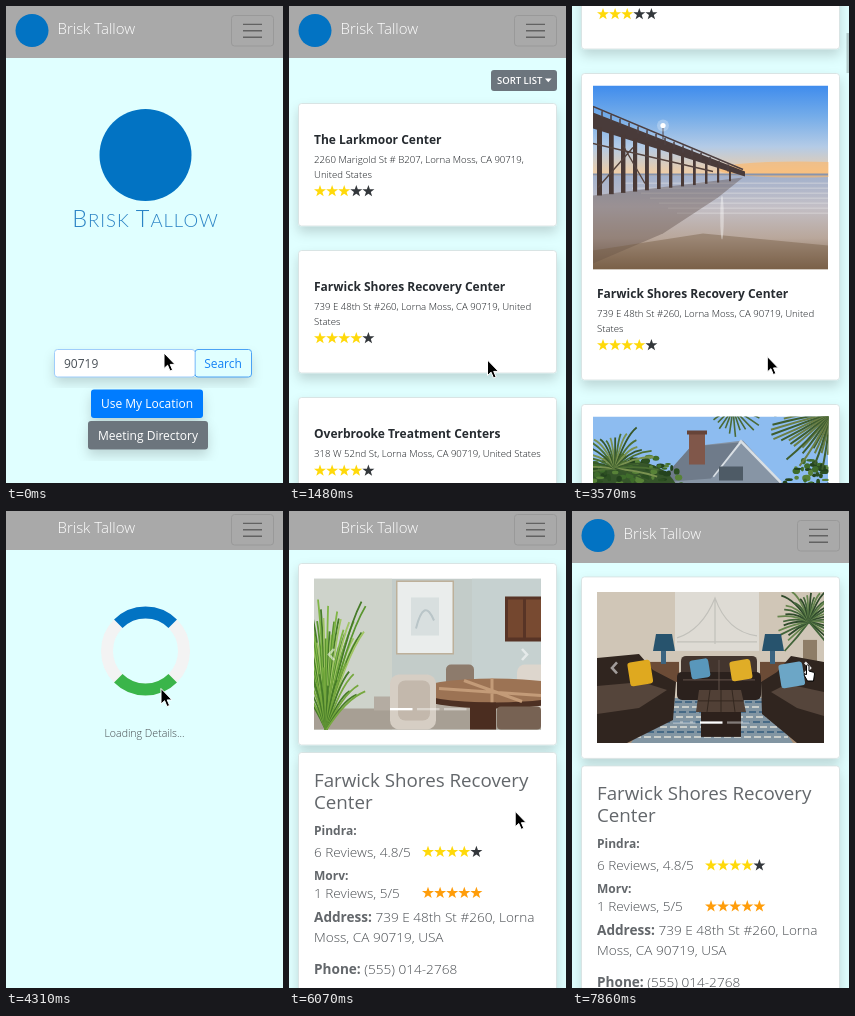
An HTML page that plays this animation: 277 px wide and 477 px high, repeating every 8000 ms.

```html
<!DOCTYPE html>
<html lang="en">
<head>
<meta charset="utf-8">
<title>Center finder</title>
<style>
html, body { margin: 0; width: 100%; height: 100%; overflow: hidden; background: #e0ffff; }
svg { display: block; }
text { font-family: "Open Sans", sans-serif; white-space: pre; }
.light { font-weight: 300; }
.bold { font-weight: 700; }
.mark { font-family: Lato, sans-serif; font-weight: 300; letter-spacing: 1px; }
</style>
</head>
<body>
<svg id="stage" width="100%" height="100%" viewBox="0 0 277 477"></svg>
<script>
const LOOP = 8000, STEP = 148.2;
const BLUE = '#0273c3', GREEN = '#3ab54a', GRAY = '#6c757d', INK = '#4a4e52', SOFT = '#63676b';

let seed = 7;
const rnd = () => (seed = (seed * 16807) % 2147483647) / 2147483647;
const repeat = (n, f) => Array.from({ length: n }, (_, i) => f(i)).join('');

const rect = (x, y, w, h, fill, more = '') =>
  `<rect x="${x}" y="${y}" width="${w}" height="${h}" fill="${fill}" ${more}/>`;
const poly = (points, fill, more = '') => `<polygon points="${points}" fill="${fill}" ${more}/>`;
const oval = (x, y, rx, ry, fill, more = '') =>
  `<ellipse cx="${x}" cy="${y}" rx="${rx}" ry="${ry}" fill="${fill}" ${more}/>`;
const line = (d, color, width = 1, more = '') =>
  `<path d="${d}" fill="none" stroke="${color}" stroke-width="${width}" ${more}/>`;
const text = (x, y, str, size, fill, more = '') =>
  `<text x="${x}" y="${y}" font-size="${size}" fill="${fill}" ${more}>${str}</text>`;
const group = (id, body) => `<g id="${id}">${body}</g>`;
const frame = (x, y, w, h, body) => `<svg x="${x}" y="${y}" width="${w}" height="${h}">${body}</svg>`;
const LIGHT = 'class="light"', BOLD = 'class="bold"', MID = 'text-anchor="middle"';
const SHADOW = 'filter="url(#shadow)"';

const panel = (y, h) =>
  rect(9.5, y, 258, h, '#fff', `rx="3" stroke="#d5dfdf" stroke-width=".8" ${SHADOW}`);

function star(cx, cy, fill) {
  const pts = Array.from({ length: 10 }, (_, i) => {
    const r = i % 2 ? 2.5 : 6.3, a = (i - 2.5) * Math.PI / 5;
    return `${(cx + r * Math.cos(a)).toFixed(1)},${(cy + r * Math.sin(a)).toFixed(1)}`;
  });
  return poly(pts.join(' '), fill);
}
const stars = (x, y, n, color = '#ffd90a') =>
  repeat(5, i => star(x + 6 + i * 12.1, y, i < n ? color : '#33373b'));

// Scattered leaves inside an ellipse
const leaves = (x, y, rx, ry, n, colors) => repeat(n, i => {
  const a = rnd() * 6.28, d = Math.sqrt(rnd());
  return oval((x + rx * d * Math.cos(a)).toFixed(1), (y + ry * d * Math.sin(a)).toFixed(1),
    (1.5 + rnd() * 3).toFixed(1), (1 + rnd() * 2.2).toFixed(1), colors[i % colors.length]);
});
// Long blades fanning out from one point
const fan = (x, y, r, from, to, n, colors, width = 2) => repeat(n, i => {
  const a = (from + (to - from) * i / (n - 1)) * Math.PI / 180, k = r * (.6 + .4 * rnd());
  const ex = x + k * Math.cos(a), ey = y + k * Math.sin(a);
  return line(`M${x} ${y}Q${(x + k * .5 * Math.cos(a)).toFixed(1)} ${(y + k * .7 * Math.sin(a) - 4).toFixed(1)} ${ex.toFixed(1)} ${ey.toFixed(1)}`,
    colors[i % colors.length], width);
});

const greens = ['#2c4f22', '#3f6c2b', '#24431e', '#588238'];

const courtyard = () =>
  rect(0, 0, 235, 194, '#f1f4f5') +
  leaves(75, 18, 60, 20, 50, ['#a6b59a', '#7f9670', '#c6cfbd']) +
  poly('0,24 42,40 42,130 0,140', '#b9b5a8') + poly('0,14 48,36 48,48 0,32', '#55493f') +
  poly('36,64 130,58 130,122 36,125', '#a29b8c') + poly('60,56 135,46 135,60 52,66', '#75695d') +
  poly('175,40 235,26 235,125 175,118', '#a59e92') + poly('165,36 235,14 235,44 165,52', '#6d5c4e') +
  rect(203, 66, 18, 24, '#59645f') + rect(8, 52, 12, 34, '#535b53') +
  line('M14 78H48M14 92H48' + repeat(9, i => `M${14 + i * 4} 78V92`), '#8d4a44', 1.2) +
  rect(0, 112, 235, 82, '#44662a') + leaves(120, 108, 105, 18, 130, greens) +
  poly('0,150 52,128 88,124 50,160 58,194 0,194', '#cfcac2') +
  oval(122, 152, 76, 34, '#5d9430') + oval(112, 158, 46, 13, '#82b843') + oval(130, 138, 52, 12, '#365c24') +
  poly('58,194 90,180 190,182 190,194', '#4c7d2a') +
  rect(45, 0, 10, 130, '#aaa193') + rect(92, 14, 8, 102, '#9b9081') +
  fan(96, 16, 44, 150, 390, 18, ['#8aa077', '#66824f', '#a9b79a'], 1.6) +
  line('M146 112L150 80M152 112L156 80M156 112L166 82', '#665341', 3.5) +
  oval(153, 54, 45, 34, '#35592a') + leaves(153, 52, 48, 38, 230, ['#2f5226', '#41682f', '#284720', '#58803d']) +
  leaves(15, 126, 24, 10, 30, greens) + rect(0, 134, 20, 34, '#3e4742') + rect(20, 126, 24, 26, '#596058') +
  line('M184 194V166L232 98M186 186L235 120' + repeat(10, i => `M${187 + i * 5} ${162 - i * 6.8}V${190 - i * 4}`), '#8d2d2b', 2.6) +
  line('M6 194L62 182V194M34 187V194', '#a53530', 2.2);

const pier = () =>
  rect(0, 0, 235, 92, 'url(#sky)') + rect(0, 90, 235, 94, 'url(#sea)') +
  oval(205, 84, 80, 8, '#ffb766', 'opacity=".6"') + rect(0, 88, 235, 2, '#8694ae') +
  repeat(7, i => rect(30 + i * 9, 97 + i * 5, 205 - i * 9, 1.5, '#e6e4e6', 'opacity=".35"')) +
  poly('0,110 150,92 125,112 70,148 0,178', '#5e4d48', 'opacity=".4"') +
  poly('0,165 110,148 235,160 235,184 0,184', '#775d45', 'opacity=".45"') +
  poly('0,27 152,86 152,91 0,43', '#493b3a') +
  line('M0 21L150 84' + repeat(16, i => `M${i * 9} ${22 + i * 3.8}v7`), '#4d3f40', 1.5) +
  repeat(12, i => rect(4 + i * 12, 42 + i * 3.7, 5 - i * .28, 68 - i * 5, '#4a3a37')) +
  line('M0 58L120 86M5 102L40 62M30 60L52 98', '#54423c', 1.4) +
  line('M70 40V54', '#4d3f40') + oval(70, 40, 2.6, 2.6, '#fff') + oval(70, 40, 6, 6, '#fff', 'opacity=".25"') +
  oval(129, 132, 1.8, 22, '#fff', 'opacity=".4"');

const house = () =>
  rect(0, 0, 235, 184, '#8dbcf0') +
  poly('66,66 98,30 150,24 188,66 188,184 66,184', '#8795a5') + line('M120 60L148 25L188 66', '#d9dfe4', 2.5) +
  poly('66,66 98,30 146,26 118,62', '#6f7b8a') + rect(96, 16, 16, 32, '#80574a') + rect(94, 14, 20, 4, '#664439') +
  rect(126, 50, 24, 14, '#4e5b66') + oval(36, 80, 50, 36, '#35552a') +
  leaves(38, 74, 54, 38, 190, greens) + leaves(220, 76, 32, 36, 100, greens) +
  fan(22, 52, 48, 170, 380, 24, ['#4d7034', '#7a9250', '#38572a'], 1.8) +
  fan(238, -4, 66, 90, 190, 24, ['#3f5e30', '#6b7f45'], 2) + fan(140, -8, 32, 20, 150, 11, ['#4b6a37'], 1.6);

const dining = () =>
  rect(0, 0, 227, 151, '#c3ccc9') + rect(0, 0, 78, 151, '#ced3cb') + rect(158, 0, 69, 151, '#c6d1d0') +
  rect(82, 2, 58, 74, '#bdb09a') + rect(83.5, 3.5, 55, 71, '#eaedec') + rect(97, 19, 28, 38, '#d8dfdf') +
  line('M102 50Q110 18 120 42', '#b9c5c8', 2) +
  rect(191, 18, 36, 45, '#583426') + rect(194, 21, 15, 38, '#74472f') + rect(212, 21, 15, 38, '#784a31') +
  rect(0, 130, 227, 21, '#a79f94') + rect(60, 118, 167, 14, '#b4aca2') +
  fan(12, 152, 135, 252, 291, 36, ['#5a962f', '#80b646', '#467b28', '#a0c565'], 1.8) +
  fan(12, 152, 70, 235, 315, 18, ['#467b28', '#76a83e'], 1.8) +
  rect(132, 86, 28, 24, '#8d7b6c', 'rx="5"') + rect(203, 86, 32, 60, '#ddd6cd', 'rx="8"') +
  oval(180, 117, 76, 13, '#4d3023') + oval(180, 112, 76, 12, '#9c7354') +
  line('M125 110L227 117M150 102L208 123M178 100V124', '#c39b78', 3) +
  rect(156, 124, 26, 27, '#4b2d20') + rect(183, 128, 44, 23, '#776253', 'rx="4"') +
  rect(76, 96, 46, 55, '#d6cec4', 'rx="9"') + rect(84, 102, 32, 40, '#c3b8ac', 'rx="7"');

const pillow = (x, y, w, h, fill) => rect(x, y, w, h, fill, `rx="3" transform="rotate(-9 ${x} ${y})"`);
const lamp = x => rect(x + 8, 58, 5, 14, '#3b6480') + poly(`${x + 3},42 ${x + 19},42 ${x + 22},59 ${x},59`, '#27536d');
const lounge = () =>
  rect(0, 0, 227, 151, '#d0c6b7') + rect(0, 110, 227, 41, '#a58b72') +
  rect(78, 0, 84, 59, '#dedbd4') + line('M80 46Q105 38 118 6Q130 40 160 44M118 6V52M80 50H160', '#c2c1bb', 1.2) +
  fan(212, 30, 40, 130, 410, 34, ['#43653a', '#67864e', '#2f4a2b'], 1.8) + rect(206, 48, 14, 24, '#8e7d67') +
  rect(52, 70, 30, 20, '#6b4b36') + rect(163, 70, 30, 20, '#6b4b36') + lamp(56) + lamp(165) +
  poly('62,106 166,106 196,151 34,151', '#8295a2') +
  repeat(8, i => line(`M${58 - i * 3} ${110 + i * 5}H${170 + i * 3}`, i % 2 ? '#c8cdca' : '#476a86', 2, 'stroke-dasharray="7 3"')) +
  rect(84, 64, 76, 25, '#43352e', 'rx="5"') + rect(80, 80, 84, 28, '#2b211d', 'rx="5"') + line('M86 88H158M122 68V104', '#63534a') +
  poly('0,66 42,62 56,78 79,90 76,128 30,151 0,151', '#30251f') + poly('0,94 45,90 70,98 42,116 0,122', '#55453b') +
  poly('227,70 194,64 180,80 164,90 165,122 200,151 227,151', '#30251f') + poly('227,100 190,92 174,100 200,116 227,124', '#55453b') +
  pillow(30, 71, 23, 24, '#dfa91f') + pillow(92, 69, 19, 19, '#5997bb') + pillow(132, 70, 21, 20, '#e0ad27') + pillow(181, 73, 24, 24, '#6ca6c6') +
  rect(104, 118, 40, 27, '#2d211c') + poly('102,98 144,98 149,120 99,120', '#514036') +
  line('M101 109H147M113 98L110 120M124 98V120M135 98L138 120', '#33271f');

const centers = [
  { name: 'The Larkmoor Center', lines: ['2260 Marigold St # B207, Lorna Moss, CA 90719,', 'United States'], score: 3, h: 193.5, photo: courtyard },
  { name: 'Farwick Shores Recovery Center', lines: ['739 E 48th St #260, Lorna Moss, CA 90719, United', 'States'], score: 4, h: 184, photo: pier },
  { name: 'Overbrooke Treatment Centers', lines: ['318 W 52nd St, Lorna Moss, CA 90719, United States'], score: 4, h: 184, photo: house }
];

function list(withPhotos) {
  let y = 97.5;
  const cards = centers.map(c => {
    const h = withPhotos ? c.h : 0, tall = h + 93.5 + c.lines.length * 14.5, top = y;
    y += tall + 24.5;
    return panel(top, tall) + (h ? frame(21, top + 12, 235.5, h, c.photo()) : '') +
      text(25, top + h + 40.5, c.name, 12, '#262b30', BOLD) +
      c.lines.map((s, i) => text(25, top + h + 59.7 + i * 14.5, s, 9.6, '#15191d', LIGHT)).join('') +
      stars(25, top + h + 58.7 + c.lines.length * 14.5, c.score);
  });
  return rect(202, 64, 66, 21, GRAY, 'rx="3"') +
    text(208, 77.8, 'SORT LIST', 9.5, '#fff', 'font-weight="600"') + poly('256,72.6 262.6,72.6 259.3,76.2', '#fff') + cards.join('');
}

const home = () =>
  `<circle cx="139.5" cy="149" r="46" fill="${BLUE}"/>` +
  `<text x="139.5" y="221" class="mark" fill="#2a83c5" ${MID} font-size="18.5"><tspan font-size="23.5">B</tspan>RISK <tspan font-size="23.5">T</tspan>ALLOW</text>` +
  `<g ${SHADOW}>` + rect(48.5, 343.5, 197, 27.5, '#e0ffff', 'rx="3"') + '</g>' +
  rect(189, 343.5, 56.5, 27.5, '#e0ffff', 'rx="3" stroke="#4ba2f5"') +
  rect(48.5, 343.5, 140.5, 27.5, '#fff', 'rx="3" stroke="#9fcdfb"') +
  text(58, 361.5, '90719', 12, '#495057') + text(217, 361.5, 'Search', 12, '#1482f5', MID) +
  rect(85, 383.5, 112, 28.5, '#007bff', `rx="3" ${SHADOW}`) + text(141, 402, 'Use My Location', 12, '#fff', MID) +
  rect(82, 415, 120, 28.5, GRAY, `rx="3" ${SHADOW}`) + text(142, 433.5, 'Meeting Directory', 12, '#fff', MID);

const loading = () =>
  '<circle cx="139.5" cy="140" r="38.5" fill="none" stroke="#f3f3f3" stroke-width="12"/>' +
  line('M112.3 112.8A38.5 38.5 0 0 1 166.7 112.8', BLUE, 12) +
  line('M112.3 167.2A38.5 38.5 0 0 0 166.7 167.2', GREEN, 12) +
  `<text id="loadText" x="138.5" y="226" font-size="10.6" fill="#44494d" class="light" ${MID}></text>`;

const score = (y, site, label, n, color) =>
  text(25, y, site, 12, SOFT, BOLD) + text(25, y + (n < 5 ? 22 : 18.5), label, 13.6, INK, LIGHT) +
  stars(133, y + (n < 5 ? 17 : 13.5), n, color);
const field = (y, label, value) =>
  `<text x="25" y="${y}" font-size="13.6" fill="${INK}" class="light"><tspan class="bold" fill="${SOFT}">${label}</tspan> ${value}</text>`;

const detail = () =>
  panel(52.5, 181.5) +
  frame(25, 67.5, 227, 151.5, group('track', dining() + `<g transform="translate(227)">${lounge()}</g>`)) +
  repeat(3, i => rect(101 + i * 27, 197, 22.5, 2.3, '#fff', 'class="dot"')) +
  line('M45 138L40 143.5L45 149', '#fff', 2.6, 'opacity=".55"') +
  line('M233 138L238 143.5L233 149', '#fff', 2.6, 'id="next"') +
  panel(241.5, 300) +
  text(25, 275.5, 'Farwick Shores Recovery', 18.75, SOFT) + text(25, 298, 'Center', 18.75, SOFT) +
  score(324, 'Pindra:', '6 Reviews, 4.8/5', 4) + score(368.5, 'Morv:', '1 Reviews, 5/5', 5, '#ff9d0a') +
  field(410.5, 'Address:', '739 E 48th St #260, Lorna') + text(25, 431, 'Moss, CA 90719, USA', 13.6, INK, LIGHT) +
  field(463, 'Phone:', '(555) 014-2768');

const header = () =>
  rect(0, 0, 277, 52, '#a9a9a9', 'id="bar"') + `<circle id="logo" cx="26" cy="24.5" r="16.5" fill="${BLUE}"/>` +
  group('nav', text(51.5, 28.4, 'Brisk Tallow', 15, '#fff', LIGHT) +
    rect(225.5, 9.5, 42, 30.5, 'none', 'rx="3" stroke="#999"') +
    line('M237 18.4H256M237 24.8H256M237 31.2H256', '#626262', 1.4));

const grad = (id, stops) => `<linearGradient id="${id}" x2="0" y2="1">` +
  stops.map((c, i) => `<stop offset="${i / (stops.length - 1)}" stop-color="${c}"/>`).join('') + '</linearGradient>';

document.getElementById('stage').innerHTML =
  `<defs><filter id="shadow" x="-20%" y="-20%" width="140%" height="160%"><feDropShadow dx="0" dy="6" stdDeviation="6" flood-opacity=".16"/></filter>` +
  grad('sky', ['#3f8ced', '#74ace9', '#b4cbe6', '#f8cd9c']) + grad('sea', ['#a3b1cc', '#c3bfc6', '#b9a79b', '#7d6249']) + '</defs>' +
  rect(0, 0, 277, 477, '#e0ffff') +
  group('page', group('home', home()) + group('loading', loading()) + group('plain', list(false)) +
    group('rich', list(true)) + group('detail', detail()) + header()) +
  rect(274.5, 0, 2.5, 40, '#000', 'id="thumb" opacity=".2"') +
  group('cursor', '<path id="arrow" d="M0 0V15.5L3.6 12.2L6 18L8.6 17L6.2 11.4H11Z" stroke="#fff"/>' +
    '<path id="hand" d="M3 1.5Q4.3 0 5.5 1.5V7L10 8.3Q11 8.7 11 10L10 17H4L.5 11Q.5 9.5 3 10.5Z" fill="#fff" stroke="#000"/>');

const $ = id => document.getElementById(id);
const dots = document.querySelectorAll('.dot');
const show = (id, on) => $(id).setAttribute('display', on ? 'inline' : 'none');
const move = (id, x, y) => $(id).setAttribute('transform', `translate(${x} ${y})`);

// Keys: [step, x, y]
const pointer = [[0, 158, 347], [3, 206, 354], [8, 203, 356], [10, 198.5, 354], [13, 198.5, 354], [14, 196.5, 354], [18, 196.5, 354],
  [19, 196.3, 351.2], [23, 196.3, 351.2], [24, 195.3, 350.5], [26, 195.3, 350.5], [29, 155, 177.5], [31, 155, 177.5], [34, 162, 112],
  [39, 226.2, 300.3], [45, 226.2, 300.3], [48, 231.5, 150], [49, 231.5, 150], [50, 231.5, 153], [53, 231.5, 153]];
const scrolling = [[0, 0], [18, 0], [19, 6], [20, 190], [21, 370.5], [25, 370.5], [26, 0], [53, 0]];

function at(keys, s, axis) {
  const i = Math.max(1, keys.findIndex(k => k[0] >= s));
  const a = keys[i - 1], b = keys[i];
  return a[axis] + (b[axis] - a[axis]) * (s - a[0]) / (b[0] - a[0]);
}
const ease = p => p * p * (3 - 2 * p);

function render(t) {
  const s = Math.min(53, Math.floor((t + 12) / STEP));
  const search = s >= 4 && s < 9, opening = s >= 26 && s < 40, compact = s >= 26 && s < 42;
  const scroll = at(scrolling, s, 1);

  show('home', s < 4);
  show('loading', search || opening);
  show('plain', s >= 9 && s < 12);
  show('rich', s >= 12 && s < 26);
  show('detail', s >= 40);
  $('loadText').textContent = search ? 'Loading Results...' : 'Loading Details...';

  show('logo', !compact);
  $('bar').setAttribute('height', compact ? 39 : 52);
  move('nav', 0, compact ? -6 : 0);
  move('loading', 0, compact ? 0 : 13);
  move('detail', 0, compact ? 0 : 13.4);
  move('page', 0, -scroll);
  show('thumb', s >= 19 && s < 26);
  $('thumb').setAttribute('y', scroll * .073);

  move('track', -227 * ease(Math.min(1, Math.max(0, (s - 49.2) / 3.8))), 0);
  dots.forEach((d, i) => d.setAttribute('opacity', i === (s >= 50 ? 1 : 0) ? 1 : .4));
  $('next').setAttribute('opacity', s >= 48 ? .9 : .55);

  move('cursor', at(pointer, s, 1), at(pointer, s, 2));
  show('arrow', s < 48);
  show('hand', s >= 48);
}

const start = performance.now();
function tick() {
  render((performance.now() - start) % LOOP);
  requestAnimationFrame(tick);
}
tick();
</script>
</body>
</html>
```
